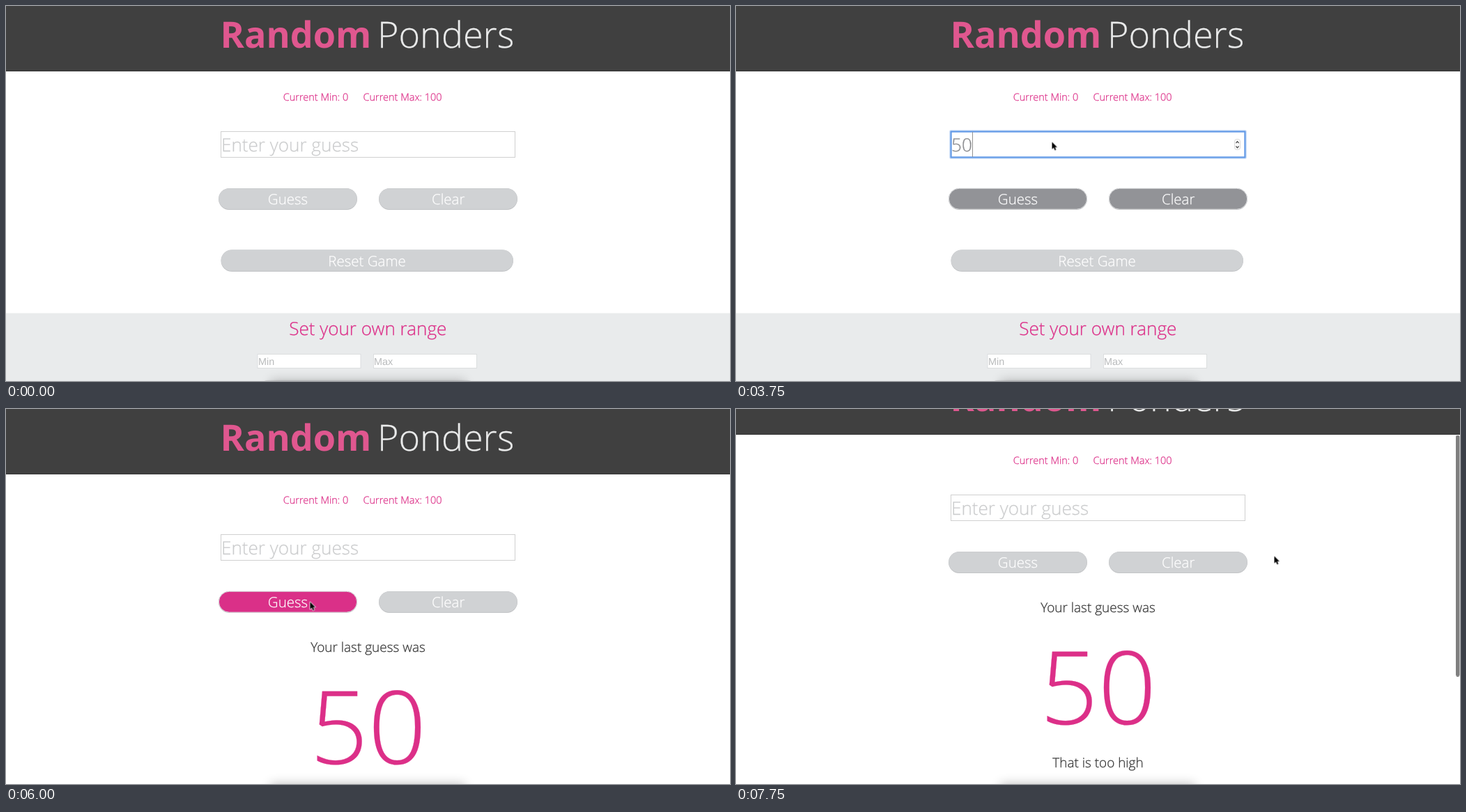
These frames come from a looping animation (1039x539 px, 8000 ms). An HTML page:

```html
<!DOCTYPE html>
<html lang="en">
<head>
<meta charset="utf-8">
<title>Random Ponders</title>
<style>
html, body { margin: 0; width: 100%; height: 100%; overflow: hidden; background: #fff; }
svg { display: block; position: absolute; left: 0; top: 0; }
text {
  font-family: "Open Sans", sans-serif; font-weight: 300; text-rendering: geometricPrecision;
  fill: currentColor; stroke: currentColor; stroke-width: .25px;
}
.mid { text-anchor: middle; }
.pink { color: #dc2f88; }
.title { font-size: 52.2px; }
.title.bold { font-weight: 700; stroke: none; }
.range { font-size: 14.5px; }
.field { font-size: 26.1px; }
.label { font-size: 20.5px; color: #fff; }
.note { font-size: 18.95px; color: #333; }
.small { font: 400 14.4px "Liberation Sans", Arial, sans-serif; color: #b9bbbc; stroke: none; }
.edge { fill: #bdbfc1; }
.face { fill: #d0d2d4; }

/* Every state change is a hard cut on a quarter-second grid. */
.step { animation: 8s step-end infinite; }
#page { animation-name: scroll; }
#setup { animation-name: setup; }
#result { animation-name: result; }
#hint { animation-name: hint; }
#ring { animation-name: ring; }
#spin { animation-name: spin; }
#first { animation-name: first; }
#second { animation-name: second; }
#caret { animation-name: caret; }
#guess { animation-name: guess; }
#clear { animation-name: clear; }
#arrow { animation-name: arrow; }
#beam { animation-name: beam; }
#bar { animation-name: bar; }

@keyframes scroll {
  0% { transform: none; }
  93.75% { transform: translateY(-27.5px); }
  96.875%, 100% { transform: translateY(-57px); }
}
@keyframes setup { 0% { visibility: visible; } 75%, 100% { visibility: hidden; } }
@keyframes result { 0% { visibility: hidden; } 75%, 100% { visibility: visible; } }
@keyframes hint {
  0%, 75%, 100% { visibility: visible; }
  43.75% { visibility: hidden; }
}
@keyframes ring {
  0%, 75%, 100% { visibility: hidden; }
  31.25% { visibility: visible; }
}
@keyframes spin {
  0%, 75%, 100% { visibility: hidden; }
  25% { visibility: visible; }
}
@keyframes first {
  0%, 75%, 100% { visibility: hidden; }
  43.75% { visibility: visible; }
}
@keyframes second {
  0%, 75%, 100% { visibility: hidden; }
  46.875% { visibility: visible; }
}
@keyframes caret {
  0%, 37.5% { visibility: hidden; transform: none; }
  31.25% { visibility: visible; transform: none; }
  43.75% { visibility: visible; transform: translateX(14px); }
  46.875%, 59.375%, 71.875% { visibility: visible; transform: translateX(29px); }
  53.125%, 65.625%, 75%, 100% { visibility: hidden; transform: translateX(29px); }
}
@keyframes guess {
  0%, 87.5%, 100% { fill: #d0d2d4; stroke: none; }
  46.875% { fill: #929397; stroke: #d9dadc; }
  62.5% { fill: #da3088; stroke: #d9dadc; }
}
@keyframes clear {
  0%, 75%, 100% { fill: #d0d2d4; stroke: none; }
  46.875% { fill: #929397; stroke: #d9dadc; }
}
@keyframes arrow {
  0% { visibility: hidden; transform: translate(676px, 54px); }
  9.375% { visibility: visible; transform: translate(676px, 54px); }
  12.5% { visibility: visible; transform: translate(596px, 133px); }
  15.625% { visibility: visible; transform: translate(585px, 141px); }
  21.875% { visibility: visible; transform: translate(564px, 151px); }
  25% { visibility: hidden; transform: translate(471px, 197px); }
  28.125% { visibility: visible; transform: translate(453.5px, 195.5px); }
  59.375% { visibility: visible; transform: translate(448px, 243px); }
  62.5% { visibility: visible; transform: translate(434px, 275px); }
  65.625% { visibility: visible; transform: translate(436.5px, 277.5px); }
  87.5% { visibility: visible; transform: translate(761px, 301px); }
  90.625%, 100% { visibility: visible; transform: translate(772.5px, 211.5px); }
}
@keyframes beam {
  0%, 28.125%, 100% { visibility: hidden; }
  25% { visibility: visible; }
}
@keyframes bar {
  0% { visibility: hidden; transform: none; }
  93.75% { visibility: visible; transform: none; }
  96.875%, 100% { visibility: visible; transform: translateY(19.5px); }
}
</style>
</head>
<body>
<svg width="1039" height="539" viewBox="0 0 1039 539">
  <defs>
    <filter id="soft" x="-20%" y="-200%" width="140%" height="500%">
      <feGaussianBlur stdDeviation="8"/>
    </filter>
  </defs>
  <rect width="1039" height="539" fill="#fff"/>

  <g id="page" class="step">
    <rect width="1039" height="94" fill="#404040"/>
    <rect y="93" width="1039" height="1" fill="#373737"/>
    <text class="title bold" x="307.5" y="60" color="#e0578f">Random</text>
    <text class="title" x="533" y="60" color="#eaebeb">Ponders</text>

    <text class="range pink" x="397.7" y="136">Current Min: 0</text>
    <text class="range pink" x="512.5" y="136">Current Max: 100</text>

    <rect x="308.5" y="180.5" width="422" height="37" fill="#fff" stroke="#d0d0d0"/>
    <g id="ring" class="step" fill="none">
      <rect x="308" y="180" width="423" height="38" rx="1" stroke="#6a9fe8" stroke-opacity=".3" stroke-width="4"/>
      <rect x="308.5" y="180.5" width="422" height="37" stroke="#5f97e6" stroke-width="2"/>
    </g>
    <text id="hint" class="step field" x="309" y="208.7" color="#cbcccd">Enter your guess</text>
    <g class="field" color="#8c8d90">
      <text id="first" class="step" x="309" y="208.7">5</text>
      <text id="second" class="step" x="324" y="208.7">0</text>
    </g>
    <rect id="caret" class="step" x="310" y="181" width="1" height="36" fill="#939393"/>
    <g id="spin" class="step" fill="none">
      <rect x="715.5" y="191.5" width="8" height="15" rx="3" fill="#fafafa" stroke="#d8d8d8"/>
      <path d="M717.5 197l2-2.3 2 2.3M717.5 201.5l2 2.3 2-2.3" stroke="#444" stroke-width="1.2"/>
    </g>

    <rect class="edge" x="305" y="262" width="199" height="31" rx="15.5"/>
    <rect id="guess" class="step face" x="305.4" y="262.2" width="198.2" height="30" rx="15"/>
    <text class="label mid" x="404.5" y="284.7">Guess</text>
    <rect class="edge" x="535" y="262" width="199" height="31" rx="15.5"/>
    <rect id="clear" class="step face" x="535.4" y="262.2" width="198.2" height="30" rx="15"/>
    <text class="label mid" x="634.7" y="284.7">Clear</text>

    <g id="setup" class="step">
      <rect class="edge" x="308.5" y="350.5" width="419.5" height="31.3" rx="15.6"/>
      <rect class="face" x="308.8" y="350.5" width="419" height="30.3" rx="15.1"/>
      <text class="label mid" x="518" y="373.7">Reset Game</text>
      <rect y="441.5" width="1039" height="98" fill="#e9ebec"/>
      <text class="field pink mid" x="519.3" y="473">Set your own range</text>
      <g fill="#fff" stroke="#dcdedf">
        <rect x="361" y="500.5" width="148" height="20"/>
        <rect x="527.5" y="500.5" width="148" height="20"/>
      </g>
      <text class="small" x="362" y="516">Min</text>
      <text class="small" x="528" y="516">Max</text>
      <rect class="face" x="361" y="537.7" width="316" height="31" rx="15.5"/>
    </g>

    <g id="result" class="step">
      <text class="note mid" x="519.5" y="349">Your last guess was</text>
      <text class="pink mid" x="519.8" y="510.3" font-size="146">50</text>
      <text class="note mid" x="519.5" y="572">That is too high</text>
    </g>
  </g>

  <rect x="380" y="539" width="278" height="24" fill="#000" opacity=".26" filter="url(#soft)"/>
  <rect id="bar" class="step" x="1033" y="18" width="5.5" height="347" rx="2.7" fill="#000" fill-opacity=".5"/>
  <path id="beam" class="step" d="M468.5 189.5q2.5 0 2.5 2v12q0 2-2.5 2M473.5 189.5q-2.5 0-2.5 2M471 203.5q0 2 2.5 2M469.5 199h3" fill="none" stroke="#333"/>
  <path id="arrow" class="step" d="M0 0V10.3L2.4 8.1 4.1 11.9 5.9 11.1 4.2 7.4H7.5Z" fill="#000" stroke="#fff" stroke-width="1.4" paint-order="stroke" stroke-linejoin="round"/>
</svg>
</body>
</html>
```
